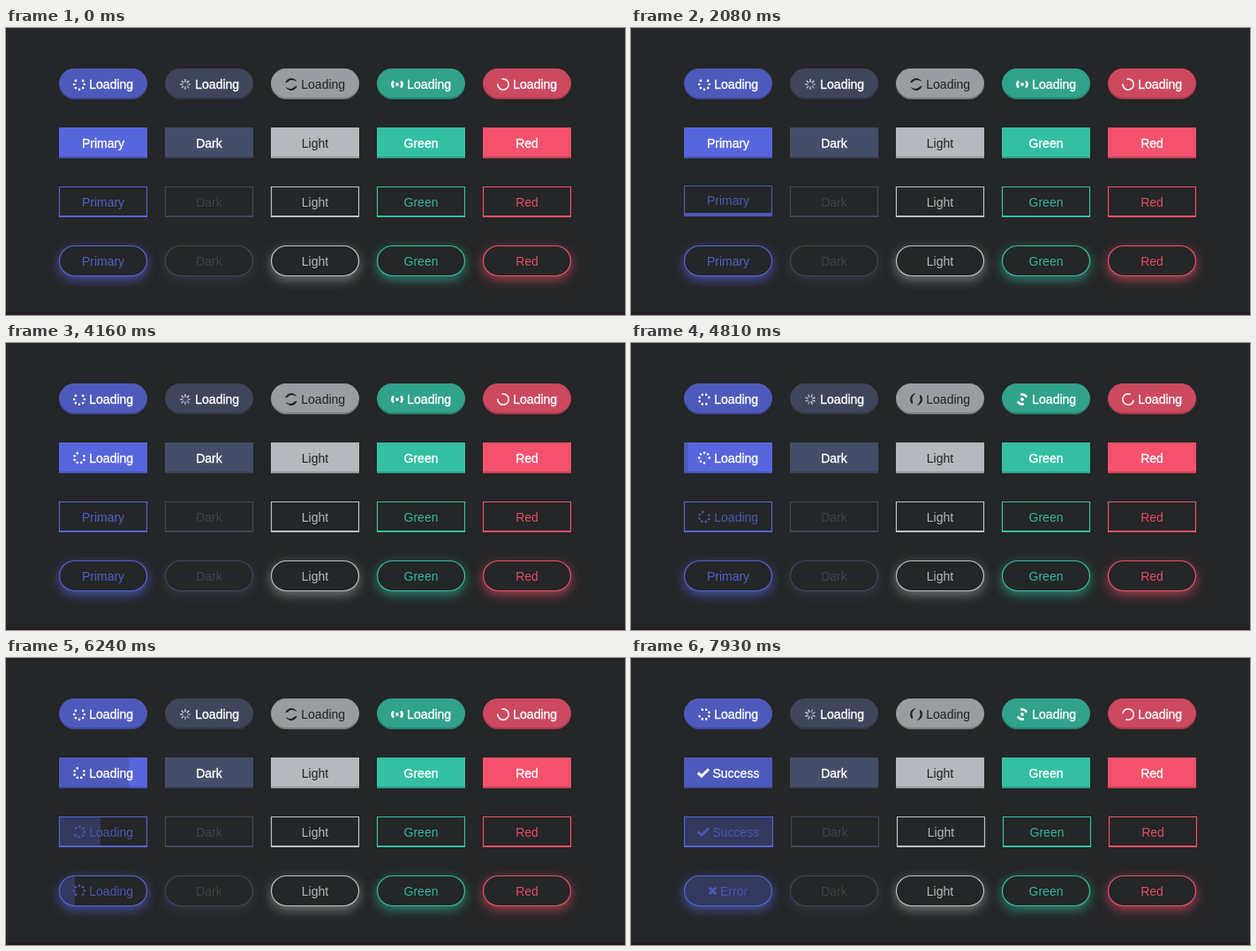
These frames come from a looping animation (701x326 px, 8000 ms). An HTML page with a canvas:

```html
<!DOCTYPE html>
<html lang="en">
<head>
<meta charset="utf-8">
<title>Button styles</title>
<style>
html, body { margin: 0; width: 100%; height: 100%; overflow: hidden; background: #242627; }
canvas { display: block; }
</style>
</head>
<body>
<canvas id="stage" width="701" height="326"></canvas>
<script>
const ctx = document.getElementById('stage').getContext('2d');
const LOOP = 8000, STEP = 130, SPIN = 2080, FILL = 1920;
const W = 100, H = 35, TAU = Math.PI * 2, DEG = Math.PI / 180;
const ROW_Y = [46, 113, 180, 247];
const BG = [36, 38, 39];

const THEMES = [
  { name: 'Primary', rgb: [88, 102, 222], ink: '#fff', line: [86, 99, 212], glow: 0.75 },
  { name: 'Dark', rgb: [69, 78, 105], ink: '#fff', line: [64, 70, 90], text: [64, 68, 79], glow: 0.5 },
  { name: 'Light', rgb: [182, 184, 190], ink: '#202224', line: [190, 192, 197], glow: 0.6 },
  { name: 'Green', rgb: [52, 191, 163], ink: '#fff', line: [52, 191, 163], glow: 0.65 },
  { name: 'Red', rgb: [244, 81, 108], ink: '#fff', line: [238, 80, 106], glow: 0.65 }
];

// Click, start of the progress fill and final state of the first button in rows 1-3
const JOBS = [
  null,
  { click: 4030, fill: 4720, end: 'Success' },
  { click: 4655, fill: 5340, end: 'Success' },
  { click: 5205, fill: 5895, end: 'Error' }
];

const css = (c, a = 1) => `rgba(${c.map(Math.round).join(',')},${a})`;
const mix = (a, b, k) => a.map((v, i) => v + (b[i] - v) * k);
const clamp = v => Math.max(0, Math.min(1, v));

// The pointer sweeps row 3 leftwards, row 2 rightwards, row 1 leftwards
function hover(row, col, t) {
  const mid = [0, 3140 + (4 - col) * 220, 2060 + col * 190, 1040 - (col - 2) * 260][row];
  const pulse = (from, to) => Math.min(clamp((t - from) / 130 + 0.5), clamp(1 - (t - to) / 200));
  let h = pulse(mid - 100, mid + 100);
  if (col === 0 && row > 1) h = Math.max(h, pulse(JOBS[row].click - 160, JOBS[row].click));
  return h;
}

function box(x, y, w, h, round) {
  ctx.beginPath();
  ctx.roundRect(x, y, w, h, round ? h / 2 : 0);
}

function clipped(path, paint) {
  ctx.save();
  path();
  ctx.clip();
  paint();
  ctx.restore();
}

function label(str, x, y, color, heavy, align = 'center') {
  ctx.font = '14px "Liberation Sans", Arial, sans-serif';
  ctx.textAlign = align;
  ctx.fillStyle = ctx.strokeStyle = color;
  ctx.fillText(str, x, y);
  if (heavy) {
    ctx.lineWidth = 0.35;
    ctx.strokeText(str, x, y);
  }
}

function dot(x, y, r) {
  ctx.beginPath();
  ctx.arc(x, y, r, 0, TAU);
  ctx.fill();
}

function arc(r, from, to, width) {
  ctx.lineWidth = width;
  ctx.beginPath();
  ctx.arc(0, 0, r, from * DEG, to * DEG);
  ctx.stroke();
}

const ICONS = [
  function dots() {
    for (let i = 1; i < 8; i++) {
      const a = i * TAU / 8 - TAU / 4;
      dot(Math.cos(a) * 5.8, Math.sin(a) * 5.8, 1.35);
    }
  },
  function spokes() {
    ctx.lineWidth = 1.5;
    for (let i = 0; i < 8; i++) {
      const a = i * TAU / 8;
      ctx.globalAlpha = 0.6 + 0.05 * i;
      ctx.beginPath();
      ctx.moveTo(Math.cos(a) * 2.6, Math.sin(a) * 2.6);
      ctx.lineTo(Math.cos(a) * 6, Math.sin(a) * 6);
      ctx.stroke();
    }
  },
  function crescents() {
    for (const turn of [0, Math.PI]) {
      ctx.save();
      ctx.rotate(turn);
      ctx.beginPath();
      ctx.arc(0, 0, 7, 195 * DEG, 335 * DEG);
      ctx.quadraticCurveTo(0, -7, -4, -2.6);
      ctx.closePath();
      ctx.fill();
      ctx.restore();
    }
  },
  function waves() {
    arc(5.5, -42, 42, 2.8);
    arc(5.5, 138, 222, 2.8);
    dot(0, 0, 1.9);
  },
  function notch() {
    ctx.globalAlpha = 0.85;
    arc(6.2, -105, 185, 1.8);
  }
];

function spinner(kind, x, y, angle, color) {
  ctx.save();
  ctx.translate(x, y);
  ctx.rotate(angle);
  ctx.fillStyle = ctx.strokeStyle = color;
  ICONS[kind]();
  ctx.restore();
}

function mark(points, width, color) {
  ctx.beginPath();
  for (const [x1, y1, x2, y2] of points) {
    ctx.moveTo(x1, y1);
    ctx.lineTo(x2, y2);
  }
  ctx.lineWidth = width;
  ctx.strokeStyle = color;
  ctx.stroke();
}

function caption(str, x, y, color, heavy, angle) {
  const b = y + 23;
  if (str === 'Loading') {
    spinner(0, x + 23, y + 17.5, angle, color);
    label(str, x + 34.3, b, color, heavy, 'left');
  } else if (str === 'Success') {
    const cx = x + 15, cy = y + 18;
    ctx.lineJoin = 'miter';
    ctx.beginPath();
    ctx.moveTo(cx + 0.8, cy - 0.7);
    ctx.lineTo(cx + 4.9, cy + 3.2);
    ctx.lineTo(cx + 13, cy - 4.8);
    ctx.lineWidth = 3;
    ctx.strokeStyle = color;
    ctx.stroke();
    label(str, x + 32.5, b, color, heavy, 'left');
  } else if (str === 'Error') {
    const cx = x + 32.5, cy = y + 17.5, r = 3.8;
    mark([[cx - r, cy - r, cx + r, cy + r], [cx - r, cy + r, cx + r, cy - r]], 3, color);
    label(str, x + 41, b, color, heavy, 'left');
  } else {
    label(str, x + W / 2, b, color, heavy);
  }
}

function glow(x, y, color, alpha) {
  ctx.save();
  ctx.beginPath();
  ctx.rect(0, 0, 701, 326);
  ctx.roundRect(x, y, W, H, H / 2);
  ctx.clip('evenodd');
  ctx.shadowColor = css(color, alpha);
  ctx.shadowBlur = 13;
  ctx.shadowOffsetY = 4;
  ctx.fillStyle = css(BG);
  box(x + 0.5, y + 0.5, W - 1, H - 1, true);
  ctx.fill();
  ctx.restore();
}

function busyPill(col, t) {
  const th = THEMES[col], x = 60 + col * 120, y = ROW_Y[0];
  const face = mix(BG, th.rgb, 0.81);
  ctx.fillStyle = css(mix(face, [0, 0, 0], 0.2));
  box(x, y, W, H, true);
  ctx.fill();
  clipped(() => box(x, y, W, H, true), () => {
    ctx.fillStyle = css(face);
    box(x, y - 2, W, H, true);
    ctx.fill();
  });
  const color = col === 1 ? '#dcdde2' : th.ink;
  spinner(col, x + 23, y + 18, t / SPIN * TAU, color);
  label('Loading', x + 34.3, y + 23, th.ink, col !== 2, 'left');
}

function solid(x, y, th, lift, fill) {
  const face = mix(th.rgb, BG, 0.1 * lift);
  ctx.fillStyle = css(face);
  ctx.fillRect(x, y, W, H);
  ctx.fillStyle = css(mix(th.rgb, BG, 0.19));
  ctx.fillRect(x, y, W * fill, H);
  const edge = lift > 0.5 ? 4 : 2;
  ctx.fillStyle = `rgba(0,0,0,${lift > 0.5 ? 0.25 : 0.18})`;
  ctx.fillRect(x, y + H - edge, W, edge);
}

function outline(x, y, w, th, lift, fill, round) {
  const color = css(mix(th.line, BG, 0.18 * lift));
  ctx.fillStyle = css(th.rgb, 0.3);
  clipped(() => box(x, y, w, H, round), () => ctx.fillRect(x, y, w * fill, H));
  ctx.strokeStyle = color;
  ctx.lineWidth = 1.2;
  box(x + 0.5, y + 0.5, w - 1, H - 1, round);
  ctx.stroke();
  const edge = lift > 0.5 ? 4 : 2;
  ctx.fillStyle = color;
  if (!round) ctx.fillRect(x, y + H - edge, w, edge);
  else if (lift > 0.5) {
    clipped(() => {
      ctx.beginPath();
      ctx.roundRect(x, y, W, H, H / 2);
    }, () => {
      ctx.lineWidth = 1.5;
      box(x + 0.5, y - 0.5, W - 1, H - 1, true);
      ctx.globalAlpha = 0.4;
      ctx.stroke();
    });
  }
}

function button(row, col, t) {
  const th = THEMES[col], job = col === 0 ? JOBS[row] : null;
  const busy = job && t >= job.click;
  const fill = busy ? clamp((t - job.fill) / FILL) : 0;
  const done = fill === 1;
  const lift = busy ? 0 : hover(row, col, t);
  const up = Math.round(lift);
  // The wider result label pushes the rest of row 2 along
  const wide = row === 2 && t >= JOBS[2].fill + FILL ? 1 : 0;
  const x = 60 + col * 120 + (col ? wide : 0), y = ROW_Y[row] - up;
  const str = !busy ? th.name : done ? job.end : 'Loading';
  const angle = busy ? (t - job.click) / SPIN * TAU : 0;

  if (row === 1) {
    solid(x, y, th, lift, fill);
    caption(str, x, y - up, th.ink, col !== 2, angle);
    return;
  }
  if (row === 3) glow(x, y, th.rgb, th.glow * (1 - 0.35 * lift));
  outline(x, y, W + (col ? 0 : wide), th, lift, fill, row === 3);
  const ink = mix(th.text || th.line, BG, busy ? 0.2 : 0.06 + 0.14 * lift);
  caption(str, x, y - up, css(ink), false, angle);
}

function draw(t) {
  ctx.fillStyle = css(BG);
  ctx.fillRect(0, 0, 701, 326);
  ctx.fillStyle = '#2a1a21';
  ctx.fillRect(0, 323, 701, 3);
  for (let col = 0; col < 5; col++) busyPill(col, t);
  for (let row = 1; row < 4; row++)
    for (let col = 0; col < 5; col++) button(row, col, t);
}

function tick() {
  const t = performance.now() % LOOP;
  draw(Math.floor(t / STEP) * STEP);
  requestAnimationFrame(tick);
}
tick();
</script>
</body>
</html>
```
